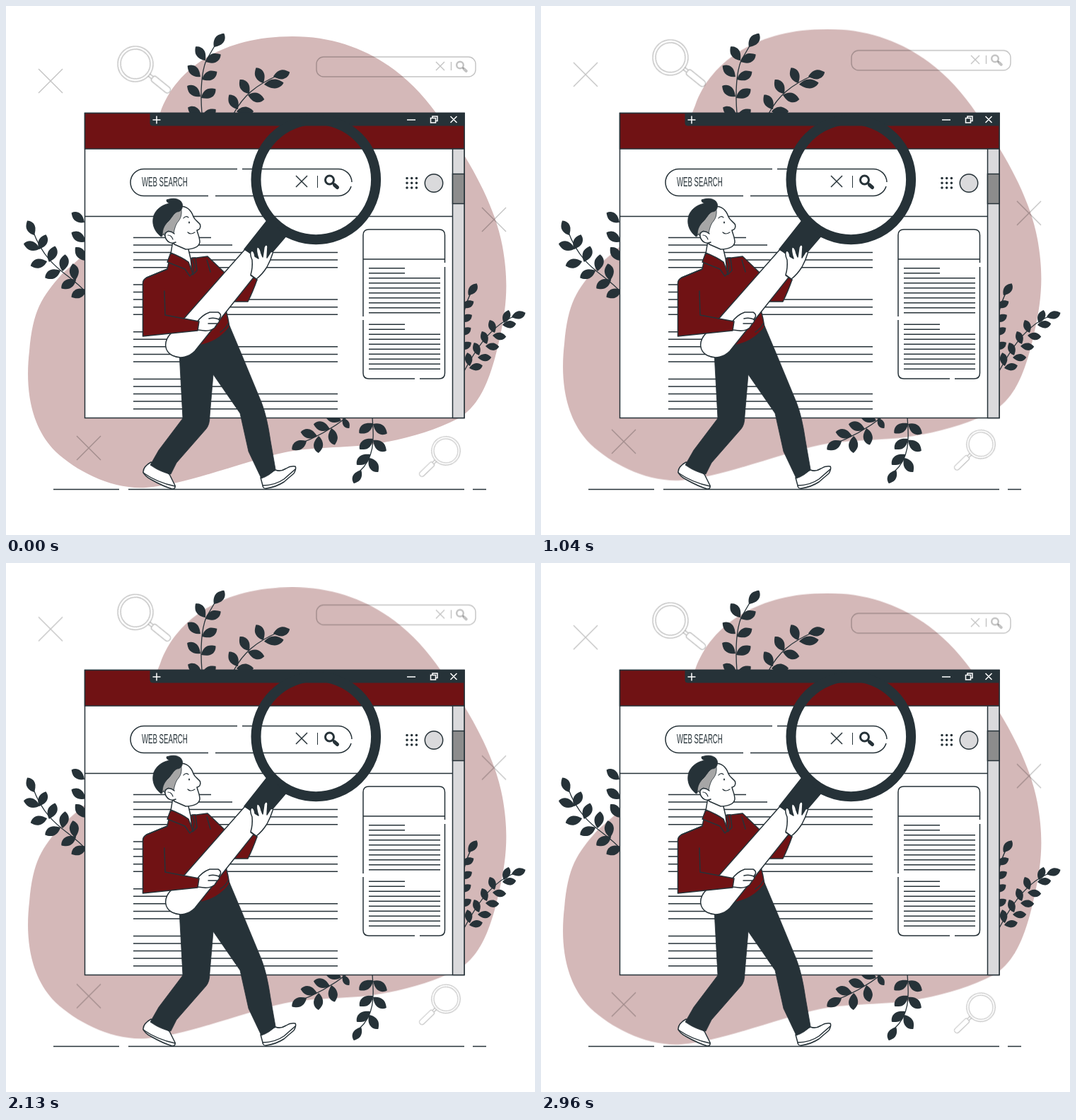
Animation, 748 px wide and 748 px high, one loop 3000 ms. Source, as an HTML page without scripts:

```html
<!DOCTYPE html>
<html lang="en">
<head>
<meta charset="utf-8">
<title>Web search</title>
<style>
html, body { margin: 0; width: 100%; height: 100%; overflow: hidden; background: #fff; }
svg { display: block; width: 100vw; height: 100vh; }
.ln { fill: none; stroke: #263238; stroke-width: 1.5; }
.round { stroke-linecap: round; stroke-linejoin: round; }
.dark { fill: #263238; }
.red { fill: #701214; }
.white { fill: #fff; }
.stem { fill: none; stroke: #263238; stroke-width: 1.3; }
.ghost { fill: none; stroke: #000; stroke-opacity: .24; stroke-width: 1.4; }
.blob { fill: #d4b8b8; animation: rise 3s linear infinite; }
.float { animation: rise 1.5s linear infinite; }
.label { font: 18.2px "Liberation Sans", Arial, sans-serif; fill: #263238; }
@keyframes rise { 50% { transform: translateY(-15px); } }
</style>
</head>
<body>
<svg viewBox="0 0 748 748">
<defs>
  <path id="leaf" d="M0 0C3-4 8-7.500 14-7C18-6.500 22-3.500 24-1.500C22 3 18 6 13 6C8 6 4 3 0 0Z"/>
  <path id="x" d="M-17-17L17 17M17-17L-17 17"/>
  <g id="lens">
    <circle r="25"/><circle r="21"/>
    <path d="M25-2H31M25 2H31M34-4.500H58A4.500 4.500 0 0 1 58 4.500H34A3 3 0 0 1 31 1.500V-1.500A3 3 0 0 1 34-4.500Z"/>
  </g>
  <g id="find">
    <circle cx="-2.500" cy="-2.500" r="6" fill="none" stroke-width="3"/>
    <path d="M2 2L4 4" stroke-width="3"/>
    <path d="M4.500 4.500L8.500 8" stroke-width="5" stroke-linecap="round"/>
  </g>
  <path id="para" d="M0 0H110M0 10.500H140M0 21H289M0 31.700H289M0 42.300H289"/>
  <path id="note" d="M0 0H51M0 7H51M0 14H101M0 21H101M0 28H101M0 35H101M0 42H101M0 49H101M0 56H101M0 63H101"/>
</defs>

<path class="blob" d="M405 43C496 43 562 88 608 151C650 210 690 275 702 340C711 390 708 425 698 470C684 535 668 565 640 583C600 603 560 614 510 621C465 625 430 624 395 631C338 643 255 677 198 681C150 684 100 658 70 630C30 590 28 530 33 488C38 430 50 412 80 378L111 351C160 300 192 215 218 151C238 93 300 43 405 43Z"/>

<g class="float ghost">
  <use href="#x" x="63" y="106"/>
  <use href="#x" x="690" y="302"/>
  <use href="#x" x="117" y="625"/>
  <use href="#lens" transform="translate(183 82) rotate(39)"/>
  <use href="#lens" transform="translate(622 629) rotate(136) scale(.81)"/>
  <rect x="439" y="72" width="225" height="28" rx="10"/>
  <path d="M608 79L620 91M620 79L608 91M629.500 79V91"/>
  <use href="#find" stroke="#000" transform="translate(644 85.500) scale(.8)"/>
</g>

<!-- plants -->
<g class="dark">
  <path class="stem" d="M277 152C275 125 276 95 283 77L300 48"/>
  <use href="#leaf" transform="translate(294 58) rotate(-50)"/>
  <use href="#leaf" transform="translate(282 77) rotate(-122)"/>
  <use href="#leaf" transform="translate(282 79) rotate(-22)"/>
  <use href="#leaf" transform="translate(275 100) rotate(-136)"/>
  <use href="#leaf" transform="translate(277 104) rotate(-24)"/>
  <use href="#leaf" transform="translate(275 128) rotate(-138)"/>
  <use href="#leaf" transform="translate(276 130) rotate(-28)"/>
  <use href="#leaf" transform="translate(277 157) rotate(-142)"/>
  <use href="#leaf" transform="translate(277 160) rotate(-32)"/>

  <path class="stem" d="M322 152C335 128 352 112 385 98"/>
  <use href="#leaf" transform="translate(378 100) rotate(-12)"/>
  <use href="#leaf" transform="translate(364 109) rotate(-112)"/>
  <use href="#leaf" transform="translate(365 111) rotate(-2) scale(1.150 1)"/>
  <use href="#leaf" transform="translate(344 124) rotate(-120)"/>
  <use href="#leaf" transform="translate(342 126) rotate(18)"/>
  <use href="#leaf" transform="translate(328 146) rotate(-118)"/>
  <use href="#leaf" transform="translate(326 149) rotate(3)"/>

  <path class="stem" d="M112 404C90 378 58 372 38 318"/>
  <use href="#leaf" transform="translate(40 324) rotate(-112) scale(.95)"/>
  <use href="#leaf" transform="translate(48 343) rotate(-160)"/>
  <use href="#leaf" transform="translate(47 344) rotate(-62) scale(.95)"/>
  <use href="#leaf" transform="translate(58 361) rotate(168)"/>
  <use href="#leaf" transform="translate(61 362) rotate(-66)"/>
  <use href="#leaf" transform="translate(77 374) rotate(158)"/>
  <use href="#leaf" transform="translate(80 375) rotate(-78)"/>
  <use href="#leaf" transform="translate(99 387) rotate(153)"/>
  <use href="#leaf" transform="translate(98 388) rotate(-95)"/>
  <use href="#leaf" transform="translate(114 401) rotate(157)"/>
  <use href="#leaf" transform="translate(111 306) rotate(-140) scale(.95)"/>
  <use href="#leaf" transform="translate(113 333) rotate(-145)"/>
  <use href="#leaf" transform="translate(113 360) rotate(-125)"/>

  <path class="stem" d="M648 516C670 475 690 450 720 438M646 440Q652 412 662 398"/>
  <use href="#leaf" transform="translate(715 440) rotate(-14) scale(.85)"/>
  <use href="#leaf" transform="translate(704 448) rotate(-66) scale(.8)"/>
  <use href="#leaf" transform="translate(702 451) rotate(-2) scale(.8)"/>
  <use href="#leaf" transform="translate(691 462) rotate(-108) scale(.8)"/>
  <use href="#leaf" transform="translate(688 466) rotate(8) scale(.8)"/>
  <use href="#leaf" transform="translate(680 478) rotate(-108) scale(.8)"/>
  <use href="#leaf" transform="translate(678 481) rotate(6) scale(.8)"/>
  <use href="#leaf" transform="translate(669 494) rotate(-108) scale(.8)"/>
  <use href="#leaf" transform="translate(667 497) rotate(3) scale(.8)"/>
  <use href="#leaf" transform="translate(656 509) rotate(-98) scale(.8)"/>
  <use href="#leaf" transform="translate(655 512) rotate(-8) scale(.8)"/>
  <use href="#leaf" transform="translate(654 409) rotate(-52) scale(.85)"/>
  <use href="#leaf" transform="translate(644 426) rotate(-22) scale(.8)"/>
  <use href="#leaf" transform="translate(642 446) rotate(-25) scale(.8)"/>
  <use href="#leaf" transform="translate(641 465) rotate(-28) scale(.8)"/>
  <use href="#leaf" transform="translate(641 485) rotate(-25) scale(.8)"/>

  <path class="stem" d="M484 580C462 597 440 610 412 620"/>
  <use href="#leaf" transform="translate(425 615) rotate(153)"/>
  <use href="#leaf" transform="translate(440 608) rotate(-163)"/>
  <use href="#leaf" transform="translate(442 608) rotate(94)"/>
  <use href="#leaf" transform="translate(458 598) rotate(-160)"/>
  <use href="#leaf" transform="translate(460 597) rotate(82)"/>
  <use href="#leaf" transform="translate(474 586) rotate(-160)"/>
  <use href="#leaf" transform="translate(476 583) rotate(60) scale(.7)"/>

  <path class="stem" d="M518 582C521 615 520 640 500 658"/>
  <use href="#leaf" transform="translate(502 656) rotate(122) scale(.9)"/>
  <use href="#leaf" transform="translate(519 590) rotate(148)"/>
  <use href="#leaf" transform="translate(519 591) rotate(38)"/>
  <use href="#leaf" transform="translate(519 612) rotate(146)"/>
  <use href="#leaf" transform="translate(519 614) rotate(42)"/>
  <use href="#leaf" transform="translate(515 634) rotate(146)"/>
  <use href="#leaf" transform="translate(513 639) rotate(60)"/>
</g>

<!-- browser window -->
<g class="ln">
  <rect class="white" x="111.500" y="151.500" width="536.500" height="431"/>
  <rect class="red" x="111.500" y="151.500" width="536.500" height="50.500"/>
  <path class="dark" d="M204 151.500H648V169H207Q204 169 204 166Z" stroke-width="1"/>
  <rect x="631.500" y="202" width="16.500" height="380.500" fill="#dadadc"/>
  <rect x="631.500" y="237.500" width="16.500" height="42" fill="#8c8c8c"/>
  <path d="M111 297.400H631"/>
  <path stroke="#fff" d="M207.500 161H218.500M213 155.500V166.500M567 161H579M628.500 156L637.500 165M637.500 156L628.500 165M600.500 158.500H607.500V165H600.500ZM603 158V156H610V162.500H608"/>
  <path d="M327 230.500H195A19 19 0 0 0 195 268.500H286M296 268.500H470A19 19 0 0 0 488 255M334 230.500H470A19 19 0 0 1 489 249"/>
  <path d="M410 240L426 256M426 240L410 256"/>
  <path d="M440.500 240V257" stroke-width="1"/>
  <use href="#find" transform="translate(460 248.500)"/>
  <path d="M567 243.500H581M567 250.300H581M567 257H581" stroke-width="3.600" stroke-linecap="round" stroke-dasharray="0 6.700"/>
  <circle cx="605" cy="250.500" r="12.700" fill="#dadadc"/>
  <use href="#para" x="180" y="327.400"/>
  <use href="#para" x="180" y="394"/>
  <use href="#para" x="180" y="460.700"/>
  <use href="#para" x="180" y="527.400"/>
  <path d="M620.500 363V324Q620.500 316 612.500 316H513Q505 316 505 324V439M505 444V519Q505 527 513 527H578M585 527H612.500Q620.500 527 620.500 519V369M505 358H620.500"/>
  <use href="#note" x="513" y="370.700" stroke-width="1.400"/>
  <use href="#note" x="513" y="450.200" stroke-width="1.400"/>
</g>
<text class="label" transform="translate(192 255) scale(.53 1)">WEB SEARCH</text>

<path class="ln" d="M67 683.500H160M173 683.500H648M660 683.500H679"/>

<!-- man -->
<g class="ln round">
  <path class="white" d="M205 645Q194 651 194 659Q196 665 206 670Q222 679 235 683Q240 683 239 678L231 662Z"/>
  <path d="M194 660Q214 674 239 679"/>
  <path class="white" d="M360 667L363 678Q363 683 369 682Q382 680 393 673Q401 666 407 661Q411 654 409 651Q402 650 396 654Q388 659 381 656Z"/>
  <path d="M363 678Q380 678 393 669Q401 662 409 655"/>
  <path class="dark" stroke-width=".8" d="M245 490L250 583L216 628L204 649Q218 659 233 662L241 646L283 598Q288 592 288 580L293 521L331 576L343 630L361 668Q373 664 381 655L374 615Q369 580 361 560L332 490L316 452L274 478Z"/>
  <path class="red" d="M233 349L228 372L199 384L225 437L250 470L272 480Q300 476 316 454Q314 441 311 430L322 418H342Q349 404 355 387L346 381L330 398L307 375L285 354L262 357Z"/>
  <path class="white" d="M236 332L233 350L257 373L262 377L262 366L261 357L257 340Z"/>
  <path class="red" d="M233 349Q248 355 258 362L264 378L260 382L253 372L228 362ZM263 356L266 366L264 380L270 374L268 356Z"/>

  <path class="white" d="M246 283C256 283 262 289 265 298C267 303 272 305 274.500 309C276 314 273 317 270 317C271 322 274 327 274 334C273 341 264 344 254 344L238 337L222 322L234 296Z"/>
  <path fill="#a6a6a6" stroke-width=".8" d="M220 324C220 311 230 305 236 296Q240 289 248 288Q249 298 244 304Q239 309 237 322L230 318Z"/>
  <path class="dark" stroke-width=".8" d="M219 326C208 317 206 306 209 296C213 286 222 281 231 279Q226 277 227 274Q239 270 246 275Q251 279 249 286Q247 291 242 291C236 294 234 300 230 304C224 309 221 315 221 325Z"/>
  <path class="white" d="M238 322C231 316 224 319 225 326C227 334 234 337 240 334"/>
  <path d="M229 324Q234 324 236 330M251 300Q254 296 258 299M257 320Q261 324 267 320" stroke-width="1.200"/>
  <ellipse class="dark" cx="259" cy="306" rx="1" ry="1.500" stroke="none"/>

  <!-- magnifying glass -->
  <circle cx="438.300" cy="245.500" r="84.800" stroke-width="14"/>
  <path class="white" d="M338 344L233 463C222 475 224 488 235 494C247 500 259 496 267 488L365 365Z"/>
  <path class="dark" d="M371 301Q382 315 398 323L362 365Q352 352 337 344Z"/>

  <!-- hands and near sleeve -->
  <path class="white" d="M346 380Q349 370 348 359Q344 350 347 346Q351 346 352 354L357 357Q353 346 355 341Q359 340 361 350L363 355L365 341Q368 335 370 340L369 356L374 348Q378 346 377 350Q374 360 369 369Q362 380 354 386Z"/>
  <path class="white" d="M270 447Q277 437 288 433L300 433Q305 436 303 440L301 443Q303 446 299 449L295 455Q289 460 280 459L271 458Z"/>
  <path d="M287 442Q294 440 301 443M286 449L298 449"/>
  <path class="red" stroke="none" d="M199 384L193.500 389V467L271 459L273 446L225 437V384Z"/>
  <path d="M228 372L199 384Q193.500 387 193.500 392V467L271 459L273 446L225 437L224 403M284 359L289 376M346 381L355 387M303 461Q311 456 314 449"/>
</g>
</svg>
</body>
</html>
```
